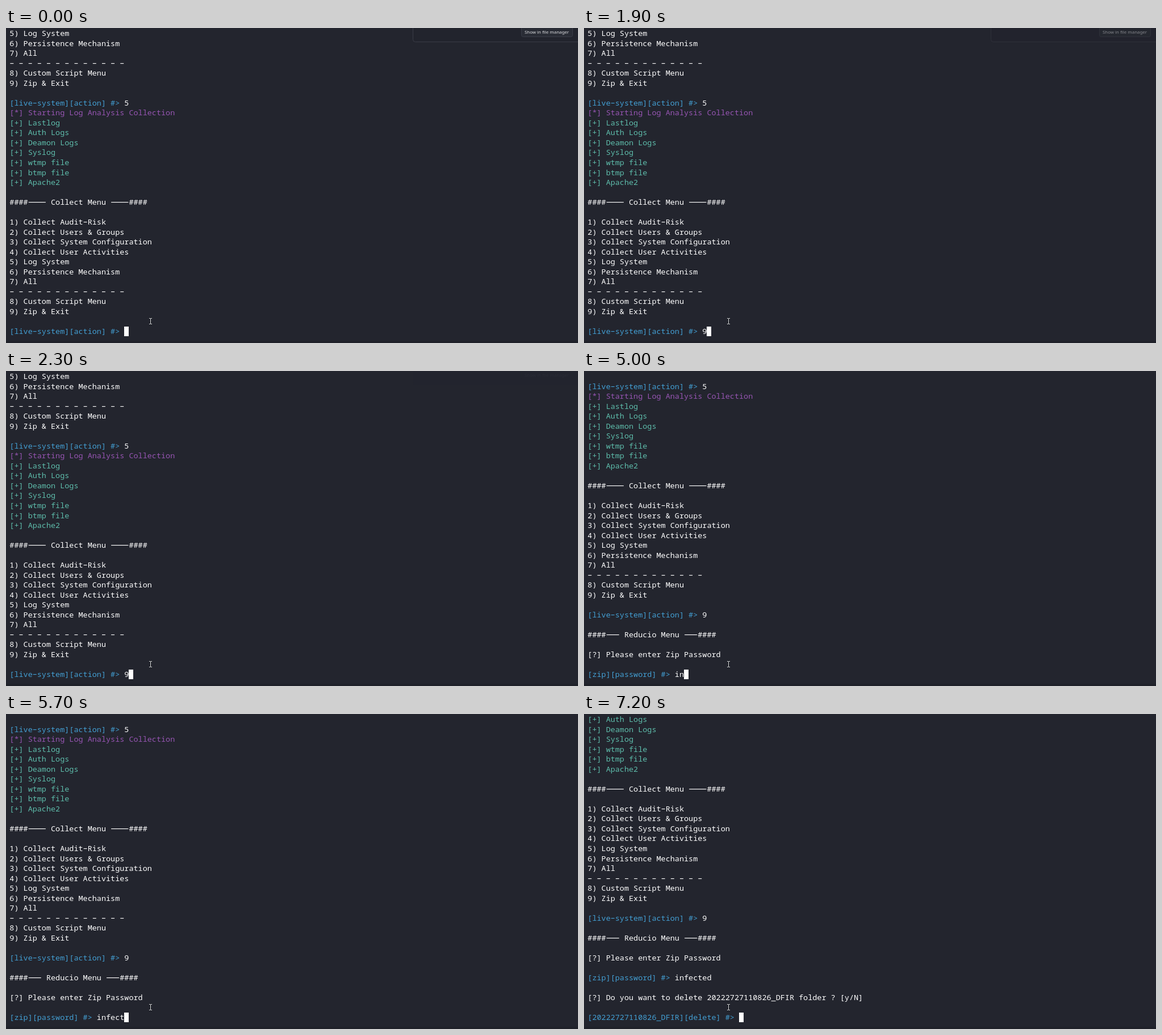
Write an HTML page with a canvas that moves like this. It is 1007x556 px and loops after 8 s.

```html
<!DOCTYPE html>
<html lang="en">
<head>
<meta charset="utf-8">
<title>Terminal session</title>
<style>
html, body { margin: 0; width: 100%; height: 100%; overflow: hidden; background: #23252e; }
canvas { display: block; }
</style>
</head>
<body>
<canvas id="stage" width="1007" height="556"></canvas>
<script>
const ctx = document.getElementById('stage').getContext('2d');
const LOOP = 8000;
const ROWS = 31, LEFT = 6.3, CELL = 8.08, LINE = 17.53;
const BG = '#23252e', WHITE = '#ffffff', BLUE = '#439fd3', GREEN = '#5ebdab', PURPLE = '#9755b3';

const menu = [
  '1) Collect Audit-Risk', '2) Collect Users & Groups',
  '3) Collect System Configuration', '4) Collect User Activities',
  '5) Log System', '6) Persistence Mechanism', '7) All',
  '- - - - - - - - - - - - -', '8) Custom Script Menu', '9) Zip & Exit', ''
];
const logs = ['Lastlog', 'Auth Logs', 'Deamon Logs', 'Syslog', 'wtmp file', 'btmp file', 'Apache2'];

const plain = text => [[text, WHITE]];
const prompt = (label, input) => [[label + ' #> ', BLUE], [input, WHITE]];
const ACTION = '[live-system][action]';

// [start time, typed text] for each input
const choiceKeys = [[0, ''], [1500, '9']];
const passwordKeys = [
  [0, ''], [5000, 'in'], [5300, 'inf'], [5500, 'infe'],
  [5700, 'infect'], [6100, 'infecte'], [6400, 'infected']
];
const typed = (keys, t) => keys.filter(k => k[0] <= t).pop()[1];

function sessionAt(t) {
  const lines = [
    ...menu.slice(4).map(plain),
    prompt(ACTION, '5'),
    [['[*] Starting Log Analysis Collection', PURPLE]],
    ...logs.map(name => [['[+] ' + name, GREEN]]),
    ...['', '####---- Collect Menu ----####', '', ...menu].map(plain),
    prompt(ACTION, typed(choiceKeys, t))
  ];
  if (t >= 2400) {
    lines.push(
      ...['', '####--- Reducio Menu ---####', '', '[?] Please enter Zip Password', ''].map(plain),
      prompt('[zip][password]', typed(passwordKeys, t))
    );
  }
  if (t >= 7200) {
    lines.push(
      ...['', '[?] Do you want to delete 20222727110826_DFIR folder ? [y/N]', ''].map(plain),
      prompt('[20222727110826_DFIR][delete]', '')
    );
  }
  return lines;
}

// Runs of hyphens join into one stroke
function drawText(text, col, base) {
  const x = LEFT + col * CELL;
  ctx.fillText(text.replace(/-/g, ' '), x, base);
  for (const run of text.matchAll(/-+/g)) {
    ctx.fillRect(x + run.index * CELL + 1.1, base - 5, run[0].length * CELL - 2.2, 1.15);
  }
}

function drawTerminal(t) {
  const lines = sessionAt(t).slice(-ROWS);
  ctx.font = '13.47px "Noto Sans Mono", "DejaVu Sans Mono", monospace';
  ctx.textAlign = 'left';
  let col = 0;
  lines.forEach((line, row) => {
    col = 0;
    for (const [text, color] of line) {
      ctx.fillStyle = color;
      drawText(text, col, Math.round(14.1 + row * LINE));
      col += text.length;
    }
  });
  ctx.fillStyle = WHITE;
  ctx.fillRect(Math.round(LEFT + col * CELL), 527, 8, 17);
}

function box(x, y, w, h, r, fill, stroke) {
  ctx.beginPath();
  ctx.roundRect(x, y, w, h, r);
  ctx.fillStyle = fill;
  ctx.fill();
  ctx.strokeStyle = stroke;
  ctx.lineWidth = 1;
  ctx.stroke();
}

function drawPopup(t) {
  const step = Math.floor(t / 100) * 100;
  const alpha = Math.min(1, 1 - (step - 1500) / 840);
  if (alpha <= 0 || t >= 2400) return;
  ctx.save();
  ctx.globalAlpha = alpha;
  box(716.5, -10.5, 310, 35, 4, '#22242d', '#393c46');
  box(907.5, -10.5, 90, 26, 3, '#292c35', '#3a3d47');
  ctx.font = '7.9px "Noto Sans", "Open Sans", sans-serif';
  ctx.textAlign = 'center';
  ctx.fillStyle = '#dcdde0';
  ctx.fillText('Show in file manager', 952, 10);
  ctx.restore();
}

function drawPointer() {
  const beam = new Path2D('M252 512.5 H254 L254.5 513 L255 512.5 H257 M254.5 513 V522 M252 522.5 H254 L254.5 522 L255 522.5 H257');
  ctx.strokeStyle = '#15171c';
  ctx.lineWidth = 2.6;
  ctx.stroke(beam);
  ctx.strokeStyle = '#e4e5e8';
  ctx.lineWidth = 1;
  ctx.stroke(beam);
}

function draw(now) {
  const t = now % LOOP;
  ctx.fillStyle = BG;
  ctx.fillRect(0, 0, 1007, 556);
  ctx.fillStyle = '#1f2129';
  ctx.fillRect(0, 552, 1007, 4);
  drawTerminal(t);
  drawPopup(t);
  drawPointer();
}

const start = performance.now();
function tick() {
  draw(performance.now() - start);
  requestAnimationFrame(tick);
}
tick();
</script>
</body>
</html>
```
